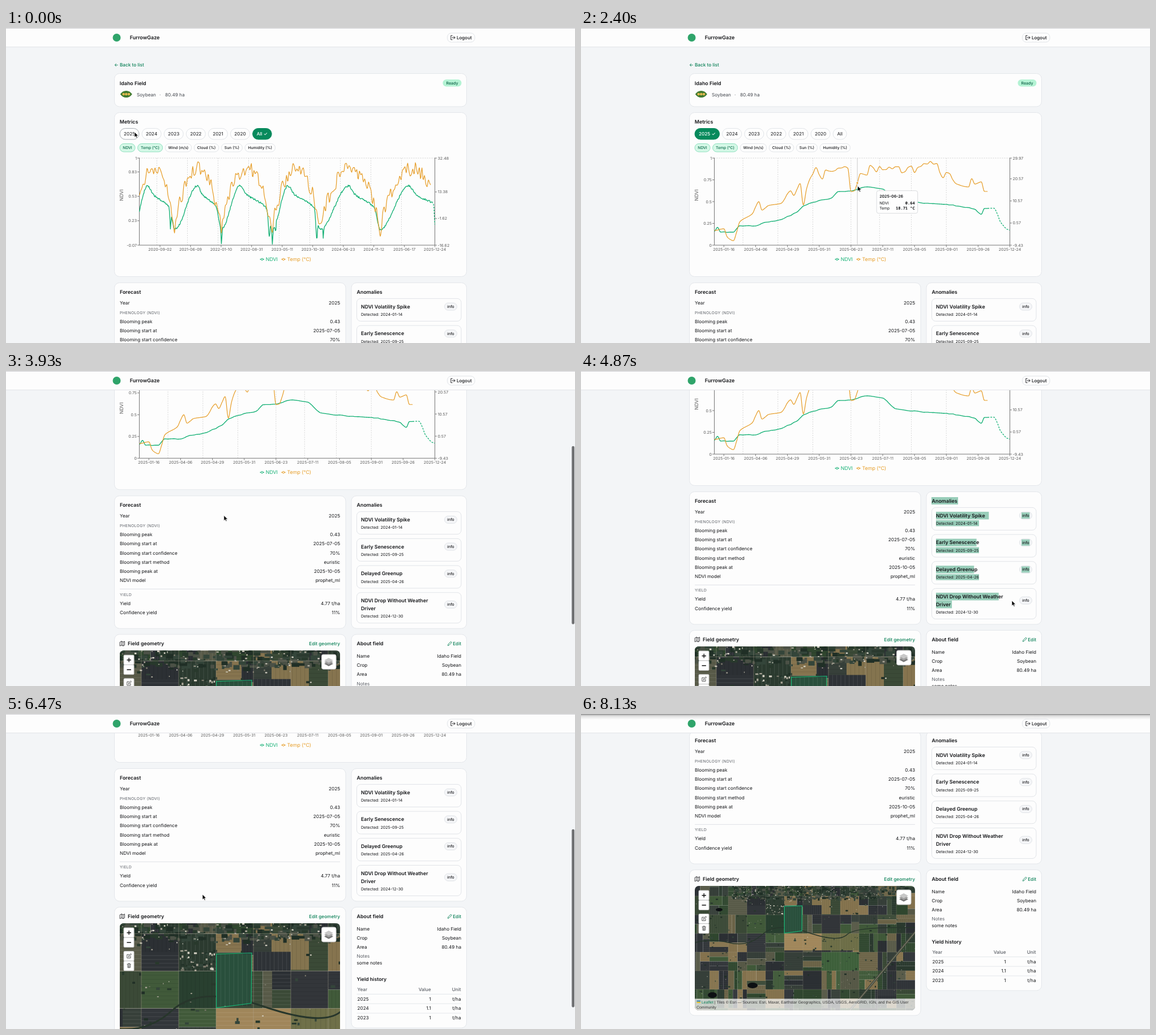
Write an HTML page that moves like this. It is 1005 px wide and 557 px high and loops after 8.2 s.

```html
<!DOCTYPE html>
<html lang="en">
<head>
<meta charset="utf-8">
<title>Field dashboard</title>
<style>
html, body { margin: 0; width: 100%; height: 100%; overflow: hidden; background: #f3f5f7; }
svg { display: block; width: 100%; height: 100%; font-family: Inter, sans-serif; text-rendering: geometricPrecision; }
</style>
</head>
<body>
<svg id="stage" viewBox="0 0 1005 557"></svg>
<script>
const LOOP = 8200, CLICK = 240, MORPH = 480;
const GREEN = '#13b074', ORANGE = '#e69c25', LINK = '#087f55', INK = '#131417', GRAY = '#5b5f66', EDGE = '#e1e4e8';
const LEFT = 235.5, RIGHT = 757.5, TOP = 230, BASE = 384, STEP = (RIGHT - LEFT) / 93, LAST = LEFT + 86 * STEP;

// ---------- helpers ----------
const clamp = (v, a, b) => Math.min(b, Math.max(a, v));
const mix = (a, b, k) => a + (b - a) * k;
const ease = u => u * u * (3 - 2 * u);
const phase = (t, a, b) => ease(clamp((t - a) / (b - a), 0, 1));
const $ = id => document.getElementById(id);

function rng(seed) {
  return () => {
    seed = (seed + 0x6D2B79F5) | 0;
    let v = Math.imul(seed ^ (seed >>> 15), 1 | seed);
    v ^= v + Math.imul(v ^ (v >>> 7), 61 | v);
    return ((v ^ (v >>> 14)) >>> 0) / 4294967296;
  };
}

// keys: [time, ...values]
function track(keys, t) {
  if (t <= keys[0][0]) return keys[0].slice(1);
  for (let i = 1; i < keys.length; i++) {
    const a = keys[i - 1], b = keys[i];
    if (t < b[0]) return a.slice(1).map((v, j) => mix(v, b[j + 1], phase(t, a[0], b[0])));
  }
  return keys[keys.length - 1].slice(1);
}

// monotone cubic through [x, y] points
function curve(p) {
  const n = p.length - 1;
  const d = i => (p[i + 1][1] - p[i][1]) / (p[i + 1][0] - p[i][0]);
  const m = p.map((_, i) => {
    if (i === 0 || i === n) return 0;
    const a = d(i - 1), b = d(i);
    return a * b <= 0 ? 0 : 2 * a * b / (a + b);
  });
  return x => {
    if (x <= p[0][0]) return p[0][1];
    if (x >= p[n][0]) return p[n][1];
    let i = 0;
    while (p[i + 1][0] < x) i++;
    const h = p[i + 1][0] - p[i][0], u = (x - p[i][0]) / h, v = 1 - u;
    return p[i][1] * v * v * (1 + 2 * u) + p[i + 1][1] * u * u * (3 - 2 * u) +
      h * (m[i] * u * v * v - m[i + 1] * u * u * v);
  };
}

function text(x, y, s, size = 8.2, o = {}) {
  return `<text x="${x}" y="${(y + size * .36).toFixed(2)}" font-size="${size}" fill="${o.fill || INK}"` +
    ` font-weight="${o.w || 400}" text-anchor="${o.a || 'start'}" ${o.x || ''}>${s}</text>`;
}
const bold = (x, y, s, size = 8.9) => text(x, y, s, size, { w: 600 });
const end = (x, y, s, o = {}) => text(x, y, s, 8.2, { a: 'end', ...o });
const rect = (x, y, w, h, r, fill, stroke = 'none') =>
  `<rect x="${x}" y="${y}" width="${w}" height="${h}" rx="${r}" fill="${fill}" stroke="${stroke}"/>`;
const card = (x, y, x2, y2) => rect(x, y, x2 - x, y2 - y, 9, '#fdfdfd', '#e4e7eb');
const line = (x1, y1, x2, y2, c, extra = '') =>
  `<path d="M${x1} ${y1}L${x2} ${y2}" stroke="${c}" fill="none" ${extra}/>`;
const icon = (d, c = INK, w = 1) =>
  `<path d="${d}" fill="none" stroke="${c}" stroke-width="${w}" stroke-linejoin="round" stroke-linecap="round"/>`;

// ---------- chart curves ----------
function rough(f, seed, amount, step) {
  const r = rng(seed), out = [];
  for (let x = LEFT; x <= RIGHT + .01; x += step) {
    const y = f(x);
    out.push([x, clamp(y + (r() * 2 - 1) * amount(y), 236, 383)]);
  }
  return curve(out);
}

// seasons: winter valleys with a summer between each pair
const valleys = [224, 298, 380, 470, 555, 661, 776], summits = [250, 338, 413, 498, 605, 711];
const growth = curve(valleys.flatMap((v, i) => {
  const s = summits[i], fall = valleys[i + 1] - s;
  return s ? [[v, 356], [s, 279], [s + fall * .2, 294], [s + fall * .8, 317]] : [[v, 356]];
}));
const clouds = [[290.5, 357], [380.5, 383], [465, 378], [470.5, 383], [476, 368], [549, 382], [560.5, 374], [757.5, 349]];
const clouded = x => clouds.reduce((y, [cx, low]) => Math.max(y, low - Math.abs(x - cx) * 18), growth(x));
function warmth(x) {
  const i = valleys.findIndex(v => v > x), a = valleys[i - 1], b = valleys[i];
  return mix(362, 249, Math.sin(Math.PI * (x - a) / (b - a)) ** .7);
}

const keyed = k => curve(k.map(([i, y]) => [LEFT + i * STEP, y]));
const growthKeys = [[0, 359], [1, 353], [2, 361], [6, 361], [8, 350], [13, 350], [15, 345], [20, 340], [26, 325], [28, 315],
  [32, 307], [37, 300], [39, 289], [42, 289], [48, 281], [53, 285], [57, 303], [67, 310], [73, 312], [79, 317],
  [82, 321], [84, 329], [85, 319], [88, 318], [90, 342], [93, 357.5]];
const warmthKeys = [[0, 358], [3, 355], [4, 369], [6, 376], [8, 343], [12, 328.1], [14, 307], [15, 322], [17, 314], [21, 310],
  [24, 288], [25, 296], [27, 275], [28, 313], [29, 285], [32, 249], [34, 266], [35, 251], [42, 250], [43, 289],
  [44, 288], [46, 260], [48, 258], [49, 237], [50, 250], [63, 250], [65, 241], [70, 242], [72, 266], [73, 253],
  [76, 275], [80, 281], [81, 265], [82, 276], [84, 272], [85, 289], [86, 289]];

const all = { ndvi: rough(clouded, 5, () => 1.8, 1), temp: rough(warmth, 11, () => 13, 2.3) };
const year = {
  ndvi: rough(keyed(growthKeys), 3, () => .6, STEP),
  temp: rough(keyed(warmthKeys), 8, y => 6 * clamp((270 - y) / 20, 0, 1), STEP)
};

function plot(name, k, from, to) {
  let d = '';
  const n = Math.ceil((to - from) / .9);
  for (let i = 0; i <= n; i++) {
    const x = mix(from, to, i / n);
    d += (i ? 'L' : 'M') + x.toFixed(1) + ' ' + mix(all[name](x), year[name](x), k).toFixed(1);
  }
  return d;
}

const tickDates = ['01-16', '04-06', '04-29', '05-31', '06-23', '07-11', '08-05', '09-01', '09-26', '12-24'].map(d => '2025-' + d);
const anchors = [[0, '2025-01-01'], [12, '2025-04-05'], [89, '2025-10-21'], ...tickDates.map((d, i) => [3 + i * 10, d])]
  .map(([i, d]) => [i, Date.parse(d)]).sort((a, b) => a[0] - b[0]);
function dateAt(i) {
  const n = Math.max(1, anchors.findIndex(a => a[0] >= i)), a = anchors[n - 1], b = anchors[n];
  return new Date(mix(a[1], b[1], (i - a[0]) / (b[0] - a[0]))).toISOString().slice(0, 10);
}

// ---------- page parts ----------
function axes(left, right, dates, x0, gap, grid) {
  const c = '#5c5c5c', thin = 'stroke-width=".8"';
  const height = (ticks, v) => mix(TOP, BASE, (ticks[0] - v) / (ticks[0] - ticks[ticks.length - 1]));
  let s = grid.map(x => line(x, TOP, x, BASE, '#cfcfcf', thin + ' stroke-dasharray="2 2"')).join('');
  left.forEach(v => {
    const y = height(left, v);
    s += line(232, y, LEFT, y, c, thin) + text(231, y, v, 7.05, { a: 'end', fill: c });
  });
  right.forEach(v => {
    const y = height(right, v);
    s += line(RIGHT, y, 761, y, c, thin) + text(762.5, y, v.toFixed(2), 7.05, { fill: c });
  });
  dates.forEach((d, i) => {
    const x = x0 + i * gap;
    s += line(x, BASE, x, BASE + 3.5, c, thin) + text(x, 391, d, 7.05, { a: 'middle', fill: c });
  });
  return s;
}

function years(sel, hover) {
  let x = 201, s = '';
  ['2025', '2024', '2023', '2022', '2021', '2020', 'All'].forEach(n => {
    const on = n === sel, w = (n === 'All' ? 24 : 34) + (on ? 9.6 : 0);
    s += rect(x, 177.5, w, 19.5, 9.75, on ? '#078a5c' : '#fefefe', on ? '#078a5c' : n === hover ? '#aab0b6' : EDGE) +
      text(x + w / 2, 187, on ? n + ' ✓' : n, 8.2, { a: 'middle', w: on ? 500 : 400, fill: on ? '#fff' : INK });
    x += w + 5.1;
  });
  return s;
}

function chips() {
  let x = 201, s = '';
  [['NDVI', 27], ['Temp (°C)', 44], ['Wind (m/s)', 46.5], ['Cloud (%)', 43.5], ['Sun (%)', 37], ['Humidity (%)', 53.5]].forEach(([n, w], i) => {
    const on = i < 2;
    s += rect(x, 204.5, w, 14.5, 7.2, on ? '#d5f8e7' : '#fefefe', on ? '#8fe0bf' : EDGE) +
      text(x + w / 2, 211.7, n, 6.8, { a: 'middle', w: 500, fill: on ? '#0b6b4b' : INK });
    x += w + 4.6;
  });
  return s;
}

function legend(x, name, c) {
  return line(x, 409, x + 7.5, 409, c, 'stroke-width="1.2"') +
    `<circle cx="${x + 3.75}" cy="409" r="1.7" fill="#fdfdfd" stroke="${c}"/>` + text(x + 10.3, 408.7, name, 8.8, { fill: c });
}

const rows = (list, x, x2, y) =>
  list.map(([a, b], i) => text(x, y + i * 16.25, a) + end(x2, y + i * 16.25, b)).join('');

function forecast() {
  const cap = (y, s) => text(201, y, s, 6.9, { fill: GRAY, x: 'letter-spacing=".3"' });
  return card(191.5, 450.5, 600, 685) + bold(201, 466.7, 'Forecast') + rows([['Year', 2025]], 201, 590, 486.2) +
    cap(503.7, 'PHENOLOGY (NDVI)') +
    rows([['Blooming peak', '0.43'], ['Blooming start at', '2025-07-05'], ['Blooming start confidence', '70%'],
      ['Blooming start method', 'euristic'], ['Blooming peak at', '2025-10-05'], ['NDVI model', 'prophet_ml']], 201, 590, 518.9) +
    line(201, 615.3, 590, 615.3, '#dfe2e6') + cap(625, 'YIELD') +
    rows([['Yield', '4.77 t/ha'], ['Confidence yield', '11%']], 201, 590, 640.3);
}

const marks = [[619, 460, 47, 13]];
function anomalies() {
  let boxes = '', words = bold(619.5, 466.7, 'Anomalies');
  [['2024-01-14', 'NDVI Volatility Spike'], ['2025-09-25', 'Early Senescence'], ['2025-04-26', 'Delayed Greenup'],
    ['2024-12-30', 'NDVI Drop Without Weather', 'Driver']].forEach(([date, ...title], i) => {
    const extra = (title.length - 1) * 14, y = 478.4 + i * 47.7, mid = y + 14.2 + extra / 2, low = y + 28 + extra;
    boxes += rect(619.5, y, 184.5, 40 + extra, 7, '#fdfdfd', EDGE) + rect(774.5, mid - 6.5, 22, 13, 6.5, '#f5f6f8', EDGE);
    title.forEach((s, j) => {
      words += bold(627, y + 14.2 + j * 14, s, 8.8);
      marks.push([627, y + 7.5 + j * 14, s.length * 4.35 + 2, 13.5]);
    });
    words += text(627, low, 'Detected: ' + date, 7.1) + text(785.5, mid, 'info', 6.9, { a: 'middle', w: 500 });
    if (!extra) marks.push([627, low - 5.5, 76, 10.5], [778, mid - 5.5, 14.5, 11]);
  });
  return card(610, 450.5, 813.5, 685) + boxes + '<g id="marks"></g>' + words;
}

function about() {
  let s = card(610, 695.5, 813.5, 909) + bold(619.5, 711.7, 'About field') + end(804, 711.7, 'Edit', { fill: LINK, w: 500 }) +
    icon('M780.5 715l.6-2.2 4.6-4.6 1.6 1.6-4.6 4.6z', LINK, .9) +
    rows([['Name', 'Idaho Field'], ['Crop', 'Soybean'], ['Area', '80.49 ha']], 619.5, 804, 733.7) +
    text(619.5, 782.5, 'Notes', 8.2, { fill: GRAY }) + text(619.5, 794.3, 'some notes') + bold(619.5, 823.3, 'Yield history', 8.7);
  [['Year', 'Value', 'Unit'], [2025, 1, 't/ha'], [2024, 1.1, 't/ha'], [2023, 1, 't/ha']].forEach((r, i) => {
    const y = 840.8 + i * 16.8, o = i ? {} : { w: 500, fill: GRAY };
    s += text(620.5, y, r[0], 8.2, o) + end(750.5, y, r[1], o) + end(803.5, y, r[2], o);
    if (i < 3) s += line(619.5, y + 8.6, 804, y + 8.6, '#e4e7eb');
  });
  return s;
}

// aerial view: square sections split at random into parcels
function land() {
  const r = rng(27), CELL = 33;
  const tones = ['#32363a', '#2b3a2f', '#30472f', '#3b4a37', '#585a48', '#86744f', '#37403a', '#6d6549', '#2c3034', '#415a3a'];
  const pick = list => list[Math.floor(r() * list.length)];
  let s = '';

  function parcel(x, y, w, h, fill) {
    let d = '';
    const across = r() < .5, n = 2 + Math.round((across ? w : h) / 5);
    for (let q = 1; q < n; q++) d += across ? `M${x + w * q / n} ${y}v${h}` : `M${x} ${y + h * q / n}h${w}`;
    s += rect(x, y, w, h, 0, fill) + `<path d="${d}" stroke="${r() < .5 ? '#fff' : '#000'}" stroke-width=".4" opacity=".12"/>`;
  }
  function split(x, y, w, h, depth) {
    if (depth === 0 || r() < .2) return parcel(x, y, w, h, pick(tones));
    const u = r() < .6 ? .5 : .3 + r() * .4;
    if (r() < .5) { split(x, y, w * u, h, depth - 1); split(x + w * u, y, w * (1 - u), h, depth - 1); }
    else { split(x, y, w, h * u, depth - 1); split(x, y + h * u, w, h * (1 - u), depth - 1); }
  }
  function specks(n, x, y, w, h, cols, size) {
    for (let q = 0; q < n; q++) s += rect((x + r() * w).toFixed(1), (y + r() * h).toFixed(1),
      (size * (.4 + r())).toFixed(1), (size * (.4 + r() * .6)).toFixed(1), 0, pick(cols));
  }

  for (let y = 289; y < 530; y += CELL) for (let x = 194; x < 590; x += CELL) split(x, y, CELL, CELL, 2);
  parcel(359, 388, 66, 30, '#a0865a');
  parcel(425, 388, 66, 30, '#6f7049');
  parcel(408, 322, 33, 32, '#84744f');
  parcel(326, 355, 33, 33, '#294030');
  parcel(392, 338, 33, 17, '#2e3236');
  parcel(293, 338, 33, 17, '#2e3236');
  parcel(425, 355, 33, 33, '#33363a');
  parcel(425, 421, 66, 33, '#3d5f3a');

  const trees = ['#202f26', '#28392c', '#34453a'], roofs = ['#a8a496', '#d5d1c4', '#7d7a6d'];
  specks(420, 265, 302, 310, 24, [...trees, '#4b5146'], 5);
  specks(200, 265, 302, 260, 30, roofs, 1.5);
  specks(70, 326, 336, 33, 18, [...trees, ...roofs], 2.3);
  specks(220, 201, 320, 389, 205, trees, 3);
  specks(110, 201, 330, 389, 195, roofs, 1.2);
  for (let q = 0; q < 13; q++) {
    const x = 194 + q * CELL, y = 289 + q * CELL, soft = 'stroke-width=".5" opacity=".4"';
    s += line(x, 300, x, 530, '#b3ad98', soft) + line(190, y, 595, y, '#b3ad98', soft);
  }
  s += '<path d="M190 408Q225 395 260 404T320 390T400 386T470 390T595 378" fill="none" stroke="#27362b" stroke-width="1.5"/>' +
    line(600, 374, 470, 530, '#454b3e', 'stroke-width="4"') + line(600, 374, 470, 530, '#aaa28e', 'stroke-width=".8"') +
    '<g fill="#0d1013"><ellipse cx="303" cy="480" rx="9" ry="5"/><ellipse cx="232" cy="497" rx="8" ry="5"/><ellipse cx="244" cy="346" rx="6" ry="3"/></g>';
  parcel(359.3, 340, 30.7, 46, '#2b4435');
  return s + `<path d="M359.3 340L390.5 339L390 383.5L359.3 387.5Z" fill="${GREEN}" fill-opacity=".1" stroke="#17b877" stroke-width="1.2" vector-effect="non-scaling-stroke"/>`;
}

function geometry() {
  const tile = y => rect(208, y, 18, 17.2, 1.5, '#fff', '#c4c4c4');
  const layer = (y, c) => `<path d="M562 ${y}l8-4.2 8 4.2-8 4.2z" fill="${c}"/>`;
  return card(191.5, 695.5, 600, 953) + bold(215, 711.7, 'Field geometry') +
    icon('M201.5 709l2.6-1.3 2.8 1.3 2.6-1.3v6.8l-2.6 1.3-2.8-1.3-2.6 1.3zM204.1 707.7v6.8M206.9 709v6.8', INK, .8) +
    end(590, 711.7, 'Edit geometry', { fill: LINK, w: 500 }) +
    `<g clip-path="url(#mapClip)"><g id="land">${land()}</g><path d="M201 923.500h389v21h-389z" fill="#fff" opacity=".72"/></g>` +
    [732, 749.2, 773.5, 790.7].map(tile).join('') +
    icon('M214 740.7h6.4M217.2 737.5v6.4M214 758h6.4', '#111', 1.4) +
    icon('M217 779.3h-3.2v6.2h6.2v-3M216.3 783l.3-1.6 3.8-3.7 1.2 1.2-3.8 3.8z', '#444', .9) +
    icon('M214 796.3h6.4M216 796v-1h2.4v1M214.7 797l.4 5.6h4.2l.4-5.6M216.4 798v3.6M218 798v3.6', '#555', .9) +
    rect(557.5, 731, 25.5, 26, 3, '#fff', '#c4c4c4') + layer(747.5, '#777') + layer(744.5, '#a2a2a2') + layer(741.3, '#c8c8c8') +
    rect(204.5, 926.5, 6.5, 2.3, 0, '#3a86b8') + rect(204.5, 928.8, 6.5, 2.3, 0, '#e8c531') +
    `<g font-family="'Liberation Sans', Arial, sans-serif">` +
    text(213, 929, `<tspan fill="${LINK}">Leaflet</tspan> | Tiles © Esri — Sources: Esri, Maxar, Earthstar Geographics, USDA, USGS, AeroGRID, IGN, and the GIS User`, 6.95, { fill: '#333' }) +
    text(204, 938.5, 'Community', 6.95, { fill: '#333' }) + '</g>';
}

const beans = [-1, 0, 1].map(i => `<circle cx="${212.3 + i * 4.7}" cy="117" r="2.3" fill="#e0b84f"/>`).join('');
const page = text(191, 64.7, '← Back to list', 8.2, { fill: LINK, w: 500 }) +
  card(191.5, 80.5, 813.5, 139) + bold(200.8, 97.3, 'Idaho Field') +
  rect(771.5, 91, 33, 12.5, 6.2, '#b4f3d4') + text(788, 97.3, 'Ready', 7.05, { a: 'middle', w: 500, fill: '#0b5f45' }) +
  '<path d="M201.8 117Q206 111 212.3 111T222.8 117Q218.6 123 212.3 123T201.8 117Z" fill="#3f7a2f"/>' + beans +
  text(231, 118, 'Soybean', 8.2, { fill: '#44484f' }) + text(271, 118, '·', 8.2, { fill: GRAY }) + text(281, 118, '80.49 ha', 8.2, { fill: '#44484f' }) +
  card(191.5, 149.5, 813.5, 439.5) + bold(200.8, 166, 'Metrics') +
  `<g id="yearsAll">${years('All', '2025')}</g><g id="yearsOne">${years('2025')}</g>` + chips() +
  line(LEFT, TOP, RIGHT, TOP, '#c4c4c4', 'stroke-width=".8" stroke-dasharray="2 2"') +
  `<g id="axesAll">${axes([1, .83, .53, .23, -.07], [32.48, 13.38, -1.62, -16.62],
    ['2020-09-02', '2021-06-09', '2022-01-10', '2022-08-31', '2023-05-11', '2023-10-30', '2024-06-23', '2024-11-12', '2025-06-17', '2025-12-24'],
    272, 53.95, Array.from({ length: 9 }, (_, i) => 266.5 + 54 * i))}</g>` +
  `<g id="axesOne">${axes([1, .75, .5, .25, 0], [29.97, 20.57, 10.57, .57, -9.43],
    tickDates, LEFT + 3 * STEP, 10 * STEP, [9, 20, 31, 43, 52, 62, 73].map(i => LEFT + i * STEP))}</g>` +
  icon(`M${LEFT} ${TOP}V${BASE}H${RIGHT}V${TOP}`, '#666', .9) +
  text(0, 0, 'NDVI', 8.6, { a: 'middle', fill: '#5c5c5c', x: 'transform="translate(204 295.5) rotate(-90)"' }) +
  `<g fill="none" stroke-width="1.2" stroke-linejoin="round"><path id="ndvi" stroke="${GREEN}" stroke-width="1.35"/>` +
  `<path id="dash" stroke="${GREEN}" stroke-width="1.3" stroke-dasharray="3 2"/><path id="temp" stroke="${ORANGE}"/></g>` +
  legend(448.5, 'NDVI', GREEN) + legend(486.3, 'Temp (°C)', ORANGE) + '<g id="tip"></g>' +
  forecast() + anomalies() + geometry() + about();

const header = rect(0, 0, 1005, 33, 0, '#fdfdfd') + line(0, 33.5, 1005, 33.5, '#e2e4e8') + line(0, .5, 1005, .5, '#cfd0d2') +
  '<circle cx="195.5" cy="17" r="7" fill="#2fa46a"/>' + text(218.8, 17.2, 'FurrowGaze', 9, { w: 600 }) +
  rect(779.5, 9, 48.5, 16, 7, '#fefefe', EDGE) +
  icon('M788.2 13.3h-2.4v7.4h2.4M788 17h5M791 14.9l2.100 2.100-2.100 2.100', INK, .9) +
  text(796, 17.2, 'Logout', 8, { w: 500 });

$('stage').innerHTML = '<defs><clipPath id="mapClip"><rect x="201" y="724" width="389" height="220" rx="7"/></clipPath>' +
  '<linearGradient id="shade" x2="0" y2="1"><stop stop-color="#555" stop-opacity=".6"/><stop offset=".4" stop-color="#777" stop-opacity=".2"/><stop offset="1" stop-color="#777" stop-opacity="0"/></linearGradient></defs>' +
  rect(0, 0, 1005, 557, 0, '#f3f5f7') + `<g id="page">${page}</g>` + header +
  '<rect id="bar" x="999.3" width="4.7" height="315" rx="2.3" fill="#6f7072"/>' +
  '<rect id="top" width="1005" height="10" fill="url(#shade)"/>' +
  '<path id="cursor" d="M0 0V9.3L2.2 7.3L3.7 10.6L5.2 9.9L3.8 6.7H6.7Z" fill="#000" stroke="#fff" stroke-width=".7"/>';

// ---------- motion ----------
const SELECT = 4450, SELECTED = 4920, DESELECT = 5180;
const cursorKeys = [[0, 227, 184], [420, 227, 184], [1260, 741, 318], [1420, 741, 318], [2000, 600, 292], [2600, 450, 275],
  [3180, 303, 270], [3750, 303, 270], [4280, 606, 216], [SELECT, 619, 223], [4820, 761, 406], [SELECTED, 761, 406],
  [5170, 112, 340], [5280, 118, 340], [5850, 347, 319], [7060, 347, 319], [7260, 720, 417], [7600, 724, 421], [8080, 640, -16]];
const scrollKeys = [[3260, 0], [3400, 39], [4000, 237], [5650, 237], [6400, 354], [6500, 354], [6730, 420]];

function tooltip(t) {
  const [cx, cy] = track(cursorKeys, t);
  if (t < CLICK + 100 || t > 3520 || cx < LEFT || cx > RIGHT || cy < TOP || cy > BASE) return '';
  const snap = x => clamp(Math.round((x - LEFT) / STEP), 0, 93);
  const i = snap(cx), x = LEFT + i * STEP, hasTemp = i <= 86, w = hasTemp ? 72.5 : 57, h = hasTemp ? 40 : 31;
  const ny = year.ndvi(x), ty = year.temp(x);
  const [lx, ly] = track(cursorKeys, t - 70);
  const ax = LEFT + snap(lx) * STEP;
  const bx = x + 6 + w > RIGHT ? ax - 6 - w : ax + 6, by = Math.min(ly + 5.5, BASE - h);
  const dot = (y, c) => `<circle cx="${x}" cy="${y}" r="2" fill="${c}" stroke="#fff" stroke-width=".8"/>`;
  const row = (dy, a, b) => text(bx + 5, by + dy, a, 6.8) +
    text(bx + w - 5, by + dy, b, 7, { a: 'end', w: 600, x: `font-family="'Noto Sans Mono', monospace"` });
  return line(x, TOP, x, BASE, '#c6c6c6', 'stroke-width=".9"') + dot(ny, GREEN) + (hasTemp ? dot(ty, ORANGE) : '') +
    rect(bx, by, w, h, 3.5, '#fefefe', '#d9dbde') + text(bx + 5, by + 9.7, dateAt(i), 7, { w: 600 }) +
    row(21.5, 'NDVI', ((BASE - ny) / 154).toFixed(2)) +
    (hasTemp ? row(31, 'Temp', ((BASE - ty) / 3.909 - 9.43).toFixed(2) + ' °C') : '');
}

let shownK = -1;
function draw(t) {
  const k = phase(t, CLICK, CLICK + MORPH), picked = t >= CLICK;
  [['yearsAll', !picked], ['axesAll', !picked], ['yearsOne', picked], ['axesOne', picked]]
    .forEach(([id, on]) => $(id).setAttribute('display', on ? 'inline' : 'none'));
  if (k !== shownK) {
    const stop = mix(752, LAST, k);
    $('ndvi').setAttribute('d', plot('ndvi', k, LEFT, stop));
    $('dash').setAttribute('d', plot('ndvi', k, stop, RIGHT));
    $('temp').setAttribute('d', plot('temp', k, LEFT, mix(750, LAST, k)));
    shownK = k;
  }
  $('tip').innerHTML = tooltip(t);

  const [scroll] = track(scrollKeys, t), [cx, cy] = track(cursorKeys, t);
  $('page').setAttribute('transform', `translate(0 ${-scroll})`);
  $('cursor').setAttribute('transform', `translate(${cx} ${cy})`);
  $('bar').setAttribute('y', 1.5 + scroll * .571);
  $('bar').setAttribute('opacity', phase(t, 3260, 3320) - phase(t, 4150, 4300) + phase(t, 5600, 5660) - phase(t, 6800, 6920));

  const reach = track(cursorKeys, Math.min(t, SELECTED))[1] + scroll + 3;
  $('marks').innerHTML = t > SELECT && t < DESELECT
    ? marks.filter(m => m[1] < reach).map(m => rect(...m, 0, '#98cdb9')).join('') : '';

  // the map zooms out around the resting cursor
  const z = mix(2, 1, phase(t, 6900, 7060));
  $('land').setAttribute('transform', `translate(${347 * (1 - z)} ${741.5 - 321.5 * z}) scale(${z})`);
  $('top').setAttribute('opacity', phase(t, 8000, 8120));
}

function frame() {
  draw(performance.now() % LOOP);
  requestAnimationFrame(frame);
}
frame();
</script>
</body>
</html>
```
